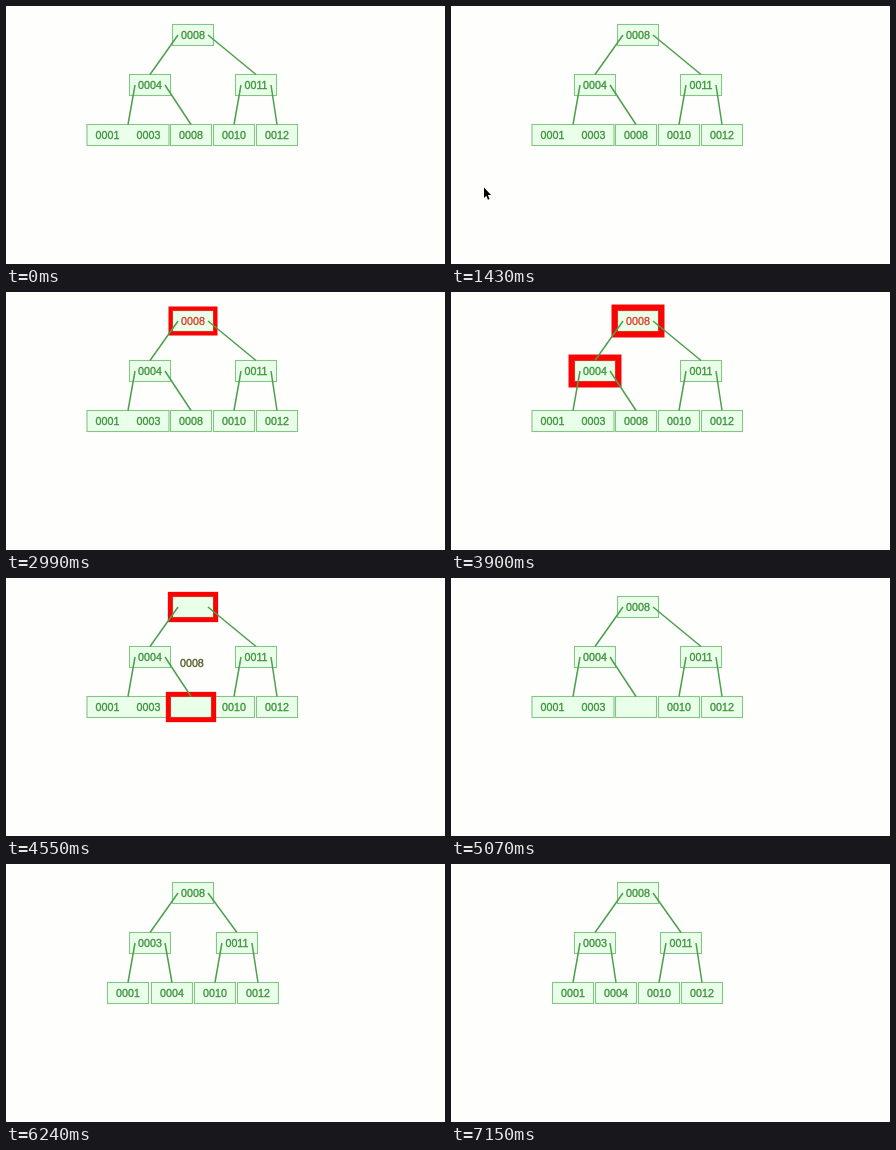
An HTML page with a canvas that plays this animation: 439x258 px, repeating every 7280 ms.

```html
<!DOCTYPE html>
<html lang="en">
<head>
<meta charset="utf-8">
<title>Tree deletion</title>
<style>
  html, body { margin: 0; width: 100%; height: 100%; overflow: hidden; background: #fefefd; }
  canvas { display: block; width: 439px; height: 258px; filter: blur(0.65px); }
</style>
</head>
<body>
<canvas id="stage" width="439" height="258"></canvas>
<script>
const ctx = document.getElementById("stage").getContext("2d");
const LOOP = 7280, STEP = 130;
const CELL = 41, HEIGHT = 21, ANCHOR = 15;
const ROWS = [29, 79, 129];
const GREEN = "#3f923f", RED = "#e03a2c";

// Start of each stage of the deletion, in ms
const AT = {
  cursorIn: 1430, visitRoot: 1930, cursorOut: 2470, found: 2895, visitChild: 3390,
  visitLeaf: 3910, lift: 4338, replaced: 4819, steal: 5301, layout: 5782, done: 6263
};

const mix = (a, b, p) => a + (b - a) * p;
const progress = (t, from, to) => Math.min(1, Math.max(0, (t - from) / (to - from)));
const during = (t, from, to) => t >= from && t < to;

// Highlight border swings linearly between its thinnest and thickest
function pulse(t) {
  const phase = ((t - 2130) / 1820 % 1 + 1) % 1;
  return 3.9 + 2.2 * Math.abs(1 - 2 * phase);
}

function label(text, x, y, color = GREEN) {
  ctx.fillStyle = ctx.strokeStyle = color;
  ctx.lineWidth = 0.35;
  ctx.fillText(text, x, y + 0.8);
  ctx.strokeText(text, x, y + 0.8);
}

function node({ x, row, keys, lit, color }, border) {
  const y = ROWS[row], w = CELL * keys.length;
  const left = x - w / 2, top = y - HEIGHT / 2;
  if (lit) {
    ctx.fillStyle = "#f80404";
    ctx.fillRect(left - border, top - border, w + 2 * border, HEIGHT + 2 * border);
  }
  ctx.fillStyle = "#eaffea";
  ctx.fillRect(left, top, w, HEIGHT);
  ctx.strokeStyle = lit ? "#e03020" : "#84c484";
  ctx.lineWidth = 1.1;
  ctx.strokeRect(left, top, w, HEIGHT);
  keys.forEach((key, i) => label(key, left + CELL * (i + 0.5), y, color));
}

function edge(parent, child, side) {
  ctx.strokeStyle = "#4c9f4c";
  ctx.lineWidth = 1.5;
  ctx.beginPath();
  ctx.moveTo(parent.x + side * ANCHOR, ROWS[parent.row]);
  ctx.lineTo(child.x, ROWS[child.row] - HEIGHT / 2);
  ctx.stroke();
}

function cursor(x, y) {
  ctx.save();
  ctx.translate(x, y);
  ctx.scale(0.88, 0.95);
  ctx.fillStyle = "#000";
  ctx.fill(new Path2D("M0 0V11L2.6 8.7L4.5 13L6.3 12.2L4.4 8H8Z"));
  ctx.restore();
}

function draw(t) {
  ctx.fillStyle = "#fefefd";
  ctx.fillRect(0, 0, 439, 258);
  ctx.font = "10.7px 'Liberation Sans', Arial, sans-serif";
  ctx.textAlign = "center";
  ctx.textBaseline = "middle";

  const shift = 20 * progress(t, AT.layout, AT.done);
  const lifting = during(t, AT.lift, AT.replaced);
  const stealing = during(t, AT.steal, AT.layout);
  const settled = t >= AT.layout;

  const root = {
    x: 187, row: 0, keys: [lifting ? "" : "0008"],
    lit: during(t, AT.visitRoot, AT.replaced),
    color: during(t, AT.found, AT.lift) ? RED : GREEN
  };
  const left = {
    x: 144, row: 1, keys: [stealing ? "" : settled ? "0003" : "0004"],
    lit: during(t, AT.visitChild, AT.visitLeaf)
  };
  const right = { x: 250 - shift, row: 1, keys: ["0011"] };
  const leaves = [
    { x: 122, keys: settled ? ["0001"] : ["0001", stealing ? "" : "0003"] },
    {
      x: 185 - shift, keys: [t < AT.lift ? "0008" : settled ? "0004" : ""],
      lit: during(t, AT.visitLeaf, AT.replaced)
    },
    { x: 228 - shift, keys: ["0010"] },
    { x: 271 - shift, keys: ["0012"] }
  ].map(leaf => ({ ...leaf, row: 2 }));

  const border = pulse(t);
  [root, left, right, ...leaves]
    .sort((a, b) => !!a.lit - !!b.lit)
    .forEach(n => node(n, border));

  if (lifting) {
    const p = progress(t, AT.lift, AT.replaced);
    label("0008", mix(185, 187, p), mix(ROWS[2], ROWS[0], p), "#525c26");
  }
  if (stealing) {
    const p = progress(t, AT.steal, AT.layout);
    label("0003", mix(142, 144, p), mix(ROWS[2], ROWS[1], p));
    label("0004", mix(144, 185, p), mix(ROWS[1], ROWS[2], p));
  }

  edge(root, left, -1);
  edge(root, right, 1);
  leaves.forEach((leaf, i) => edge(i < 2 ? left : right, leaf, i % 2 ? 1 : -1));

  if (during(t, AT.cursorIn, AT.cursorOut)) cursor(33, 181.5);
}

const start = performance.now();
function tick() {
  const t = (performance.now() - start) % LOOP;
  draw(Math.floor(t / STEP) * STEP);
  requestAnimationFrame(tick);
}
tick();
</script>
</body>
</html>
```
